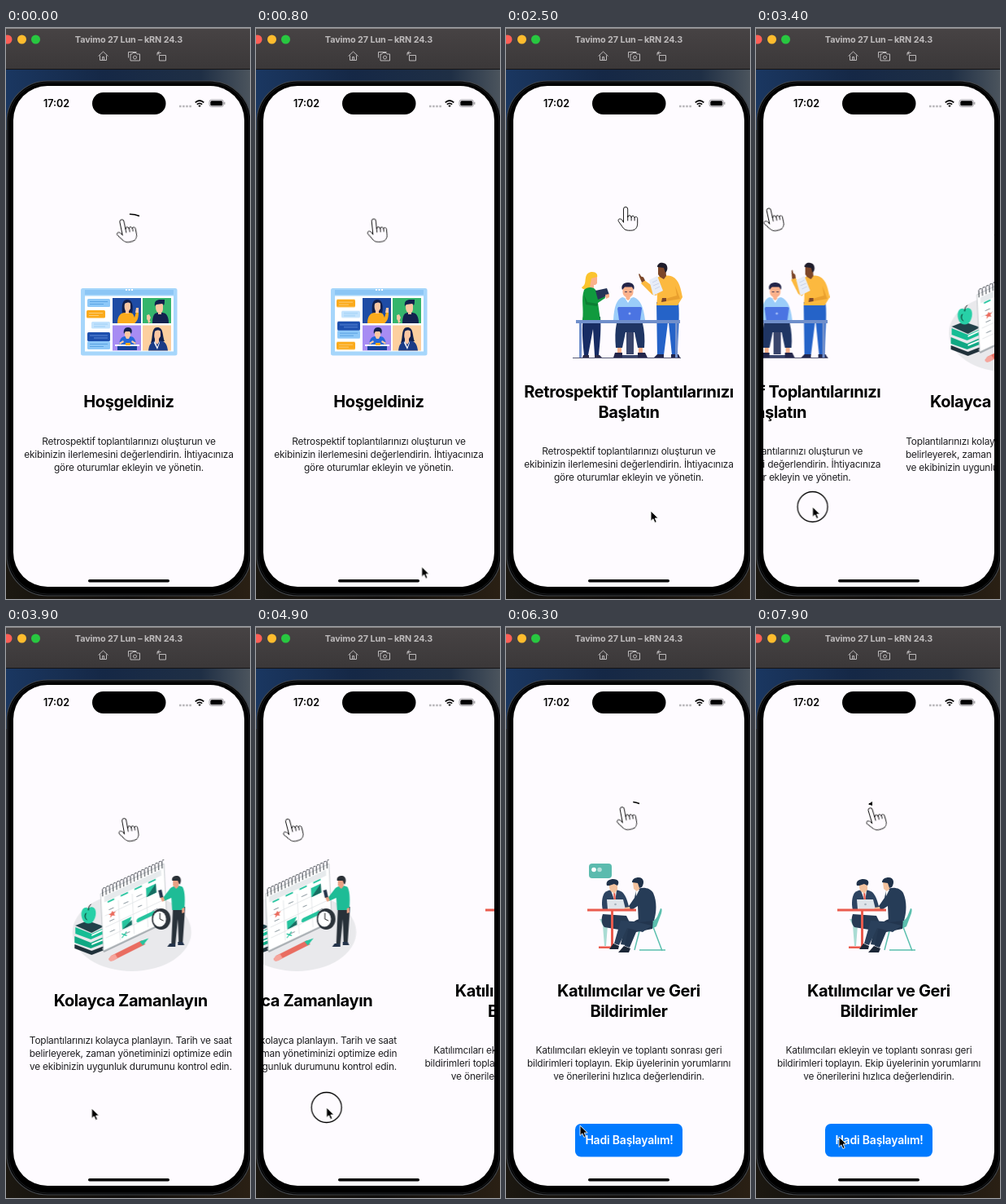
Animation, 300 px wide and 700 px high, one loop 8 s. Source, as an HTML page:

```html
<!DOCTYPE html>
<html lang="tr">
<head>
<meta charset="utf-8">
<title>Onboarding</title>
<style>
html, body { margin: 0; width: 100%; height: 100%; overflow: hidden; background: #111; }
svg { display: block; width: 300px; height: 700px; }
text { font-family: Inter, "Liberation Sans", sans-serif; text-anchor: middle; fill: #000; }
.bar { font-size: 10.8px; font-weight: 700; letter-spacing: -.1px; fill: #bebbbc; }
.clock { font-size: 12.5px; font-weight: 600; }
.title { font-size: 20px; font-weight: 700; letter-spacing: -.4px; }
.body { font-size: 11.9px; letter-spacing: -.2px; fill: #1f1f22; }
.cta { font-size: 14px; font-weight: 600; letter-spacing: -.2px; fill: #fff; }
.line { fill: none; stroke: #000; stroke-width: .9; stroke-linejoin: round; stroke-linecap: round; }
.icon { fill: none; stroke: #bdbabb; stroke-width: 1; stroke-linejoin: round; }

.pages { animation: swipe 8s linear infinite; }
@keyframes swipe {
  0%, 15% { transform: translateX(0); }
  18.75% { transform: translateX(-80px); }
  20.625% { transform: translateX(-145px); animation-timing-function: ease-out; }
  26.875%, 38.75% { transform: translateX(-284px); }
  42.5% { transform: translateX(-410px); }
  43.75% { transform: translateX(-455px); animation-timing-function: ease-out; }
  49.375%, 57.5% { transform: translateX(-568px); }
  61.25% { transform: translateX(-670px); }
  63.125% { transform: translateX(-725px); animation-timing-function: ease-out; }
  69.375%, 100% { transform: translateX(-852px); }
}
.cursor { animation: move 8s linear infinite; }
@keyframes move {
  0%, 7.5% { transform: translate(215px, 705px); }
  13.75%, 15% { transform: translate(187px, 594px); }
  18.75% { transform: translate(107px, 592px); }
  20.625% { transform: translate(42px, 591px); animation-timing-function: ease-in-out; }
  30% { transform: translate(177px, 592px); }
  31.25% { transform: translate(178px, 592px); }
  38.75% { transform: translate(196px, 588px); }
  42.5% { transform: translate(70px, 587px); }
  43.75% { transform: translate(25px, 587px); animation-timing-function: ease-in-out; }
  53.75% { transform: translate(185px, 593px); }
  57.5% { transform: translate(189px, 591px); }
  61.25% { transform: translate(87px, 589px); }
  63.125% { transform: translate(32px, 588px); animation-timing-function: ease-in-out; }
  73% { transform: translate(86px, 609px); }
  78.75% { transform: translate(91px, 611px); }
  90%, 100% { transform: translate(102px, 625px); }
}
.touch { animation: press 8s step-end infinite; }
@keyframes press {
  0%, 21.25%, 43.75%, 63.75% { opacity: 0; }
  15%, 38.75%, 57.5% { opacity: 1; }
}
.button { animation: show 8s step-end infinite; }
@keyframes show { 0% { opacity: 0; } 62.5%, 100% { opacity: 1; } }

.tilt, .trail, .tip {
  animation-duration: calc(8s / 7);
  animation-delay: calc(var(--phase) * -8s / 7);
  animation-iteration-count: infinite;
  animation-timing-function: linear;
}
.tilt { animation-name: tilt; transform-origin: 152px 245px; }
@keyframes tilt {
  0%, 100% { transform: rotate(0); }
  15% { transform: rotate(-11deg); }
  50%, 60% { transform: rotate(-17deg); }
  78% { transform: rotate(-13deg); }
}
.trail { animation-name: trail; stroke-linecap: butt; stroke-width: 1.5; }
@keyframes trail {
  0%, 8% { stroke-dasharray: 0 3; stroke-dashoffset: 0; }
  15% { stroke-dasharray: .3 3; stroke-dashoffset: 0; }
  20% { stroke-dasharray: .48 3; stroke-dashoffset: 0; }
  35% { stroke-dasharray: .75 3; stroke-dashoffset: -.1; }
  51% { stroke-dasharray: .6 3; stroke-dashoffset: -.4; }
  55% { stroke-dasharray: .06 3; stroke-dashoffset: -.94; }
  58%, 100% { stroke-dasharray: 0 3; stroke-dashoffset: -1; }
}
.tip { animation-name: tip; animation-timing-function: step-end; }
@keyframes tip { 0%, 57% { opacity: 0; } 46% { opacity: 1; } }

.chat { animation: chat 8s linear infinite; }
@keyframes chat { to { transform: translateY(-133px); } }
.arm { animation: point 2s -1.5s ease-in-out infinite; transform-origin: 182px 322px; }
@keyframes point { 0%, 100% { transform: rotate(0); } 45% { transform: rotate(18deg); } }
.bubble { animation: pop 8s linear infinite; transform-origin: 128px 308px; }
@keyframes pop {
  0%, 74.5%, 90%, 100% { transform: scale(0); }
  76.5%, 88% { transform: scale(1); }
}
.dot { fill: #fff; animation: dot 8s step-end infinite; animation-delay: var(--wait, 0s); }
@keyframes dot { 0%, 90% { opacity: 0; } 77% { opacity: 1; } }
</style>
</head>
<body>
<svg viewBox="0 0 300 700">
  <defs>
    <linearGradient id="sky">
      <stop offset="0" stop-color="#1a3761"/><stop offset=".4" stop-color="#152846"/>
      <stop offset=".8" stop-color="#1f2f45"/><stop offset="1" stop-color="#4b545d"/>
    </linearGradient>
    <linearGradient id="ground"><stop offset="0" stop-color="#1c1811"/><stop offset=".5" stop-color="#0f0d0b"/><stop offset="1" stop-color="#2a2014"/></linearGradient>
    <linearGradient id="chrome" x2="0" y2="1"><stop offset="0" stop-color="#474344"/><stop offset="1" stop-color="#3b3839"/></linearGradient>
    <clipPath id="screen"><rect x="9" y="71" width="284" height="614" rx="42"/></clipPath>
    <clipPath id="feed"><rect x="98" y="330" width="31" height="65"/></clipPath>
    <path id="fist" class="line" d="M144.5 238V222a2.6 2.6 0 0 1 5.2 0v10c0-3 4.4-3 4.4.3c0-2.6 4-2.6 4 .6c0-2 3.6-2 3.6.8v5.5c0 6-3 9-8 9h-3c-4 0-6-2-8-5l-4.2-6c-1.6-3 2-4.6 4.2-2zM149.7 231v5M154.1 232v4M158.1 233v3"/>
    <g id="talk">
      <rect x="100" y="332" width="28" height="10" rx="1.5" fill="#8dc8f8"/>
      <path d="M103 335.500h22M103 338.500h17" stroke="#4f9be0" stroke-width=".8"/>
      <rect x="99" y="346" width="23" height="9.500" rx="1.500" fill="#fbab1c"/>
      <path d="M102 349.500h17M102 352.500h12" stroke="#fdd58a" stroke-width=".8"/>
      <rect x="105" y="360" width="23" height="8.500" rx="1.500" fill="#c3e3fd"/>
      <path d="M108 363h17M108 366h14" stroke="#94c9f4" stroke-width=".8"/>
      <rect x="100" y="373" width="28" height="11" rx="1.500" fill="#1d4fae"/>
      <path d="M103 377h22M108 380h17" stroke="#6f9be4" stroke-width=".8"/>
    </g>
  </defs>

  <rect width="300" height="700" fill="#100f10"/>
  <rect y="50" width="300" height="75" fill="url(#sky)"/>
  <rect y="640" width="300" height="60" fill="url(#ground)"/>
  <rect width="300" height="50" fill="url(#chrome)"/>
  <path d="M0 .5h300" stroke="#8b8889"/>
  <path d="M0 50.500h300" stroke="#151416"/>
  <circle cx="2" cy="14" r="5.500" fill="#fe5f57"/>
  <circle cx="19.500" cy="14" r="5.500" fill="#febc2e"/>
  <circle cx="36.500" cy="14" r="5.500" fill="#28c840"/>
  <text class="bar" x="151" y="17.500">Tavimo 27 Lun – kRN 24.3</text>
  <g class="icon">
    <path d="M113.500 34.500l6-5.500 6 5.500M115.500 33.500v6h8v-6M118.500 39.500v-4h2v4"/>
    <path d="M150.500 36.500v-7h10M153 32h2l1-1.500h4l1 1.500h3.500v8H153z"/><circle cx="158.500" cy="36" r="2"/>
    <path d="M188.500 33.500h8v6.500h-8zM186 33.500v-3h4.500M188.500 28.500l-2.500 2 2.500 2"/>
  </g>

  <rect x="1" y="65" width="300" height="631" rx="50" fill="#000" stroke="#42464b" stroke-width="1.200"/>
  <rect x="3" y="67" width="296" height="627" rx="48" fill="#000" stroke="#1b1d20"/>

  <g clip-path="url(#screen)">
    <rect x="9" y="71" width="284" height="614" fill="#fefbff"/>
    <g class="pages">
      <g class="page">
        <rect x="92" y="319" width="118.500" height="82.500" rx="2.500" fill="#a6d6fb"/>
        <rect x="97" y="328.500" width="109" height="68" fill="#fff"/>
        <path d="M97 324h109" stroke="#8cc6f5" stroke-width="6"/>
        <path d="M147 321h9" stroke="#fff" stroke-width="1.800" stroke-dasharray="2 1.500"/>
        <g clip-path="url(#feed)"><g class="chat">
          <use href="#talk"/><use href="#talk" y="52"/><use href="#talk" y="104"/>
        </g></g>
        <path fill="#1e4ca5" d="M131 331h35v31h-35z"/>
        <path fill="#35b56c" d="M168 331h35v31h-35z"/>
        <path fill="#a78cf3" d="M131 364.500h35v31h-35z"/>
        <path fill="#fccf9f" d="M168 364.500h35v31h-35z"/>
        <path fill="#10204d" d="M143 350c-1-10 0-17 6-17s8 7 6 17z"/>
        <path fill="#fbab1c" d="M137 362c0-9 4-13 9-13h6c4 0 5 3 6 6l2-7 3 1c0 7-2 11-5 13z"/>
        <path fill="#fcc7a2" d="M146 338c3-2 6-2 7 0v6l-2 3v3h-4v-3c-1-2-2-5-1-9zM159 349l1-6 3 0 0 6z"/>
        <path fill="#13224f" d="M180 362c0-9 2-13 7-13h5c5 0 8 4 8 13z"/>
        <path fill="#fcc7a2" d="M184 338h9v6c0 3-1 4-2 5v2h-4v-2c-2-1-3-4-3-7zM173 357l0-5 3-1 2 4-2 5zM178 360l-3 2-1-6z"/>
        <path fill="#10204d" d="M183 341c-1-6 2-8 7-8h5c0 3 0 5-1 7l-2-2-7 1z"/>
        <path fill="#2367d8" d="M139 388c1-8 4-10 8-10h5c5 0 7 3 8 10z"/>
        <path fill="#fcc7a2" d="M146 372h7v5l-2 4h-3l-2-4zM139 386l5-3 1 2-5 3zM160 386l-5-3-1 2 5 3z"/>
        <path fill="#10204d" d="M145 375c-1-5 1-8 5-8s6 3 4 8l-2-3h-5z"/>
        <path fill="#fff" d="M134 388h30v2h-30z"/><path fill="#174299" d="M137 390h24v5h-24z"/>
        <path fill="#fbab1c" d="M147 386h6v3h-6z"/>
        <path fill="#10204d" d="M178 386c3-5 0-19 8-19s6 10 9 17z"/>
        <path fill="#1a3b86" d="M175 395.500c1-9 5-12 10-12h5c5 0 8 4 9 12z"/>
        <path fill="#fcc7a2" d="M183 372c2-2 6-2 7 0v6l-2 3v4l-2 3-3-3v-4c-1-2-1-5 0-9z"/>
        <path fill="#fff" d="M183 384l3 7 3-7v2l-3 8-4-8z"/>
      </g>

      <g class="page">
        <path d="M82 404.500h133" stroke="#2b3052" stroke-width=".8"/>
        <path fill="#fbc42e" d="M93 318c5-3 4-7 5-12 1-5 4-7 8-7 5 0 7 3 6 7l-6 5c0 5-2 8-6 9-4 1-6 0-7-2z"/>
        <path fill="#fbb18b" d="M105 307l7-2 0 8-2 2-2 0v4l-5-1z"/>
        <path fill="#172c63" d="M95 354h21c1 14 0 28-2 47h-5l-2-32-6 32h-5c-2-19-3-33-1-47z"/>
        <path fill="#109a3e" d="M96 321c3-3 8-4 12-2 4 3 5 8 7 10l6-2 1 4-9 6 3 21H94c2-13-2-26 2-37z"/>
        <path fill="#0c7f33" d="M96 327l4 9 13 2-1 3-14-2z"/>
        <path fill="#273457" d="M110 322l14-3 3 8-14 6z"/>
        <path fill="#fbb18b" d="M122 327l5-1 0 4-4 2z"/>
        <path fill="#2a2b48" d="M95 401h7v3h-8zM109 401h6l3 3h-9z"/>

        <path fill="#39456b" d="M148 362h9v38h-9zM141 401h23v3h-23z"/>
        <path fill="#1f3563" d="M136 362h32c2 9 3 19 2 30h-8l-4-19h-11l-4 19h-8c-1-11-1-21 1-30z"/>
        <path fill="#fbb18b" d="M137 392h5v7h-5zM163 392h5v7h-5z"/>
        <path fill="#23264a" d="M134 398h9v6h-11zM162 398h9l3 6h-12z"/>
        <path fill="#9bcdf9" d="M132 358c1-17 4-25 11-28l7 2 7-2c8 3 12 11 14 28z"/>
        <path fill="#fff" d="M145 329h10l-5 8z"/>
        <path fill="#fbb18b" d="M143.500 317h13v7c0 3-2 5-4 6v2l-2.500 2-2.500-2v-2c-2-1-4-3-4-6z"/>
        <path fill="#222448" d="M143 321c-2-5 1-9 7-9s9 4 7 9l-2-3.500h-9z"/>
        <path d="M146 323.500h3M151.500 323.500h3" stroke="#222448" stroke-width=".8"/>
        <path fill="#4b74e2" d="M138 342h27c2 0 2 1 2 2l-2 14h-26l-2-14z"/>
        <circle cx="152" cy="350" r="1.500" fill="#9db6f6"/>

        <path fill="#2563c8" d="M185 336h27c2 20-1 42-1 65h-7l-4-40-1 0-5 40h-8z"/>
        <path fill="#fcb93f" d="M186 306c5-3 14-3 19-1 8 4 10 15 12 25l-6 10h-26c2-11 0-22 1-34z"/>
        <path fill="#e9a02e" d="M208 316l2 12-14 4 1 3 17-3z"/>
        <path fill="#7c4629" d="M187 293l9-2 1 13-3 4-5-3-2-3zM192 331l5 0 0 4-6 1z"/>
        <path fill="#1f1d2c" d="M186 293c0-4 4-6 7-5 6 0 7 9 3 12l-2-6z"/>
        <g class="arm">
          <path fill="#fcb93f" d="M190 310l-5 18-5-1-14-14 4-4 11 8 4-9z"/>
          <path fill="#7c4629" d="M167 312l-3-7-1-3.500 1.500 0 1.500 3 3 1 2 4z"/>
        </g>
        <path fill="#e8edf8" d="M176 309l10-5 7 18-12 6z"/>
        <path d="M180 312l6-3M181 316l7-3M183 320l6-3" stroke="#c0cce6" stroke-width=".8"/>
        <path fill="#20264d" d="M186 400h8v4h-12zM203 400h9l2 4h-11z"/>
        <path fill="#708fcb" d="M86 358h128v4H86zM90 362h3v42h-3zM208 362h3v42h-3z"/>
      </g>

      <g class="page">
        <ellipse cx="152.500" cy="374" rx="73" ry="48" fill="#e9e9ec"/>
        <path fill="#20313a" d="M82 389l21 8 18-7v5l-18 7-21-8z"/>
        <path fill="#10a883" d="M82 379l20 8 18-8v8l-18 7-20-7z"/>
        <path fill="#fff" d="M103 388l17-7v2l-17 7z"/>
        <path fill="#15bd94" d="M83 368l20 8 15-7v7l-16 7-19-7z"/>
        <path fill="#fff" d="M103 377l15-7v2l-15 7z"/>
        <path fill="#22424a" d="M83 366l15-6 20 7-15 8z"/>
        <path fill="#27d0a7" d="M99 345c8-6 12 5 7 14-3 6-11 6-14 0-4-9 0-18 7-14z"/>
        <path d="M99 347c0-3 1-5 3-7M96 351c-2 3-1 6 1 8" class="line"/>
        <path fill="#a7adb1" d="M118 399l76-36v-5l-78 36z"/>
        <g transform="matrix(1 -.47 .05 1 114 327)">
          <rect width="78" height="70" fill="#fff" stroke="#b9bfc3" stroke-width=".7"/>
          <path d="M4 9h70" stroke="#e6eaec" stroke-width="7"/>
          <path d="M8 14h8M24 14h9M41 14h9M58 14h9" stroke="#27c5a0" stroke-width="2"/>
          <path d="M4 29h70M4 43h70M4 56h70M21 18v49M38 18v49M55 18v49" stroke="#e0e4e6" stroke-width=".7"/>
          <path d="M9 24h6M27 25h6M43 24h7M9 38h6M44 37h5M9 51h6M27 62h6M61 50h7M61 62h6" stroke="#87949b" stroke-width=".9"/>
          <path fill="#25c49e" d="M55 19h12v11H55zM24 45h12l-5 10h-7z"/>
          <path fill="#176d62" d="M55 30l12-11v11zM24 55l12-6v6z"/>
          <path d="M44 53h18" stroke="#25c49e" stroke-width="5" stroke-linecap="round"/>
          <path d="M23 60l6 5M29 60l-6 5" stroke="#25c49e" stroke-width="1.200"/>
          <path fill="#eb6a5b" d="M13 27l1.500 2.500h3l-2.500 2 1 3-3-2-3 2 1-3-2.500-2h3z"/>
          <path d="M2 0h75" stroke="#353b42" stroke-width="9" stroke-dasharray="1 3.300"/>
          <path d="M3 -5h75" stroke="#353b42" stroke-width="1" stroke-dasharray="2.600 1.700"/>
        </g>
        <ellipse cx="188.500" cy="358" rx="11.500" ry="13" fill="#2c333a"/>
        <ellipse cx="186.500" cy="358" rx="8" ry="9.500" fill="#fff"/>
        <path d="M187 351v7l4 2" class="line"/>
        <path fill="#e96d61" d="M124 407l3-4 38-19 4 5-38 19c-4 2-6 2-7-1z"/>
        <path fill="#f6a59c" d="M124 407l3-4 5-2 3 5-5 3c-4 1-5 1-6-2z"/>
        <path fill="#25c49e" d="M162 385.500l11-4-7 9z"/>
        <path fill="#283139" d="M203 343h15l-3 44h-5l-1-29-3 31h-5z"/>
        <path fill="#1ebc96" d="M200 320c3-3 12-4 15-1 3 6 3 17 2 28h-15l-1-15-9 4-2-3z"/>
        <path fill="#e9a184" d="M203 310h7v8l-3 3-4-4zM187 331l4-1 2 5-3 2zM214 345l3-1 0 6-3 1z"/>
        <path fill="#2b3036" d="M202 311c-1-5 3-6 6-6 5 0 6 7 3 11l-2-5z"/>
        <path fill="#24334a" d="M185 323l4-1 2 9-4 1zM199 388h7v4h-10zM209 386h6l2 4h-8z"/>
      </g>

      <g class="page">
        <g class="bubble">
          <path fill="#5bbbae" d="M106 290h20q4 0 4 4v10q0 4-4 4h-20q-4 0-4-4v-10q0-4 4-4z"/>
          <circle class="dot" cx="108" cy="297.500" r="2.800"/>
          <circle class="dot" cx="115" cy="297.500" r="2.800" style="--wait:.1s;fill:#b4e0da"/>
          <circle class="dot" cx="122" cy="297.500" r="2.800" style="--wait:.25s"/>
        </g>
        <path fill="#a9dcd3" d="M115 358h15l-5 8-2 25h-2l-2-25z"/>
        <path fill="#263a53" d="M119 352l29 2 7 14-8 22-6-1 4-17-24-4c-4-4-4-11-2-16z"/>
        <path fill="#2d4461" d="M121 326c5-5 16-5 22-1 5 5 7 13 9 22h-33c-2-8-1-16 2-21z"/>
        <path fill="#f7f7f7" d="M129 323h7l-2 14z"/><path fill="#e95a4c" d="M132 325h2l1 9-2 3z"/>
        <path fill="#f4c39e" d="M126 315h11v7l-4 5-5-4z"/>
        <path fill="#20324a" d="M124 317c-2-6 4-8 8-8 6 0 8 4 5 8l-4-2-6 2z"/>
        <path fill="#dfe5ea" d="M124 334h20l3 12h-22z"/><circle cx="134.500" cy="340" r="1.300" fill="#a5b0ba"/>
        <path fill="#5bbfae" d="M159 365c10 1 22-1 27-10l4-10c2 0 2 2 1 6l-6 16c-4 4-22 5-26 2z"/>
        <path d="M165 369l-7 27M181 368l11 29M164 396h32" fill="none" stroke="#5bbfae" stroke-width="1.500"/>
        <path fill="#22354e" d="M181 357l-1 13-20 4-8 19-6-2 5-23c2-6 10-10 18-11z"/>
        <path fill="#2a405b" d="M179 366l-21-5-17-1-8 28 6 2 10-21 19 5z"/>
        <path fill="#263c57" d="M160 322c7-4 17-3 21 4 5 11 4 24 1 34l-19 2-1-20-9 6-4-3 9-13z"/>
        <path fill="#f7f7f7" d="M159 321l5 1-4 8z"/>
        <path fill="#f4c39e" d="M156 313h9v7l-4 4-4-3zM146 344l6-1 1 4-8 0z"/>
        <path fill="#20324a" d="M155 313c0-4 4-6 8-6 6 0 8 6 4 12l-3 1-2-6z"/>
        <path fill="#ea5b4d" d="M100 345.500h60v3h-60zM129 348h3v44h-3zM114 391.500h18v2.500h-18z"/>
        <path fill="#1c2737" d="M132 388l7 3-1 4h-11zM145 391l8 3-2 5h-13z"/>
      </g>
    </g>

    <g class="button">
      <rect x="85" y="609" width="132" height="40.500" rx="7" fill="#007aff"/>
      <text class="cta" x="151.500" y="634">Hadi Başlayalım!</text>
    </g>

    <text class="clock" x="62" y="97">17:02</text>
    <rect x="106" y="79" width="90.500" height="27" rx="13.500"/>
    <path d="M213 96h15" stroke="#b9b7bb" stroke-width="2.500" stroke-dasharray="2.600 1.500"/>
    <path d="M232.700 91.300q5.300-4.600 10.600 0M234.800 93.700q3.200-2.600 6.400 0" fill="none" stroke="#000" stroke-width="1.700"/>
    <path d="M236.300 95.200q1.700-1.200 3.400 0l-1.700 1.900z"/>
    <rect x="250" y="88" width="17.500" height="8.500" rx="2.700" fill="none" stroke="#9a989c" stroke-width=".9"/>
    <rect x="251.300" y="89.300" width="15" height="6" rx="1.600"/>
    <path d="M268.800 90.800v3" stroke="#9a989c" stroke-width="1.200"/>
    <rect x="101" y="676" width="100" height="3.500" rx="1.750"/>
  </g>

  <g class="cursor">
    <circle class="touch line" r="18.500" style="stroke-width:1.300"/>
    <path d="M0 0V12.500l2.900-2.700 2 4.700 2.300-1-2-4.500h4z" stroke="#fff" stroke-width=".9"/>
  </g>
</svg>
<script>
const pages = [
  { phase: .2, title: ['Hoşgeldiniz'] },
  { phase: .81, title: ['Retrospektif Toplantılarınızı', 'Başlatın'] },
  { phase: .41, title: ['Kolayca Zamanlayın'], body: [
    'Toplantılarınızı kolayca planlayın. Tarih ve saat',
    'belirleyerek, zaman yönetiminizi optimize edin',
    've ekibinizin uygunluk durumunu kontrol edin.'] },
  { phase: .64, title: ['Katılımcılar ve Geri', 'Bildirimler'], body: [
    'Katılımcıları ekleyin ve toplantı sonrası geri',
    'bildirimleri toplayın. Ekip üyelerinin yorumlarını',
    've önerilerini hızlıca değerlendirin.'] }
];
const intro = [
  'Retrospektif toplantılarınızı oluşturun ve',
  'ekibinizin ilerlemesini değerlendirin. İhtiyacınıza',
  'göre oturumlar ekleyin ve yönetin.'];

const lines = (list, name, y, step) => list.map((s, i) =>
  `<text class="${name}" x="151" y="${y + i * step}">${s}</text>`).join('');

const hand = (phase, dy) => `<g transform="translate(0 ${dy})" style="--phase:${phase}">
  <use href="#fist" class="tilt"/>
  <path class="line trail" pathLength="1" d="M164 216.500Q152 212 139 217"/>
  <path class="tip" d="M143 214l-5 3.200 5 1.800z"/></g>`;

document.querySelectorAll('.page').forEach((el, i) => {
  const { phase, title, body = intro } = pages[i];
  const tall = title.length > 1;
  el.setAttribute('transform', `translate(${i * 284} 0)`);
  el.insertAdjacentHTML('beforeend',
    hand(phase, tall ? 0 : 14) +
    lines(title, 'title', tall ? 453 : 465, 24.5) +
    lines(body, 'body', tall ? 523 : 511, 16));
});
</script>
</body>
</html>
```
